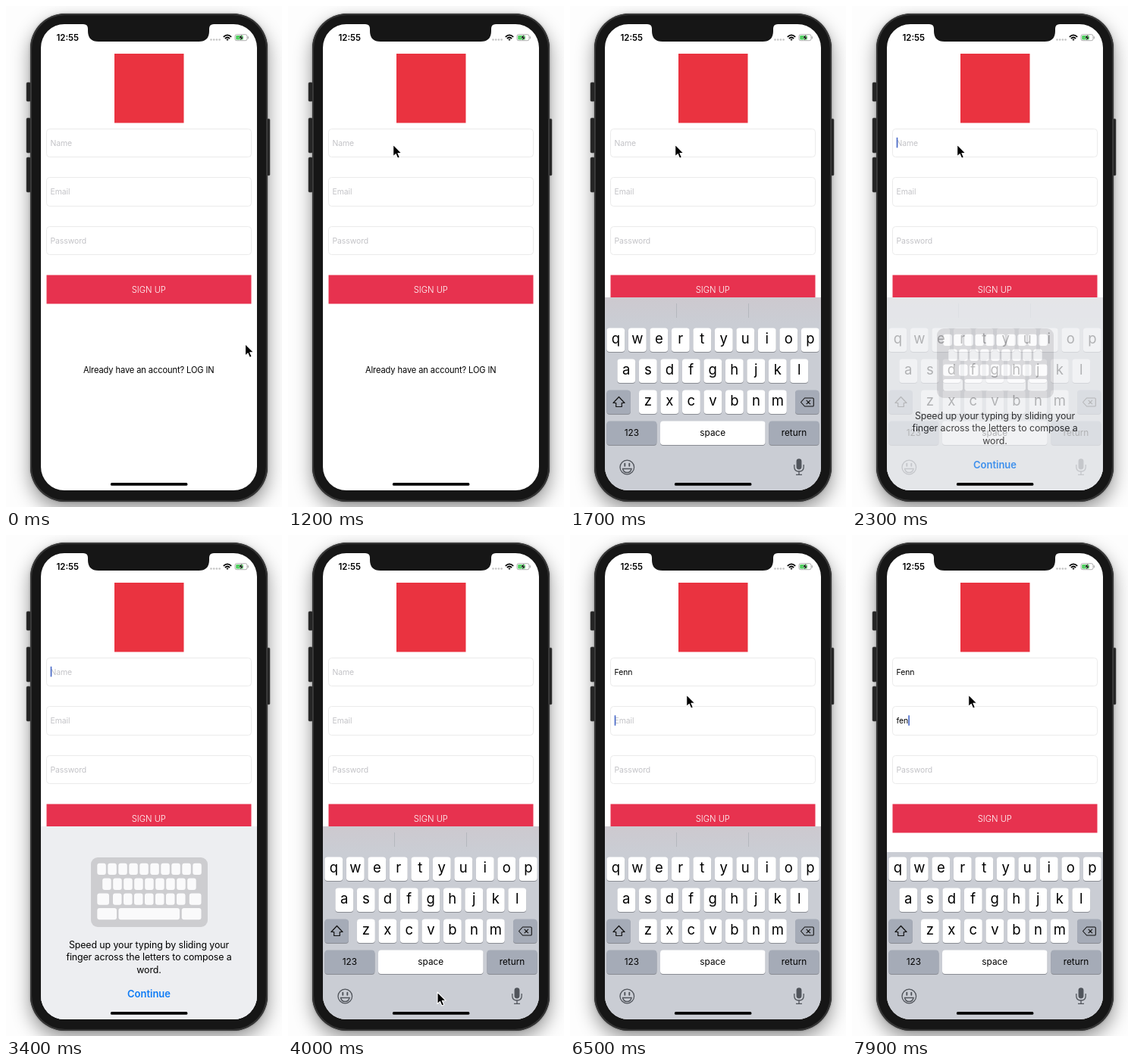
An HTML page that plays this animation: 364 px wide and 662 px high, repeating every 8 s.

```html
<!DOCTYPE html>
<html lang="en">
<head>
<meta charset="utf-8">
<title>Sign up form</title>
<style>
html, body { margin: 0; width: 100%; height: 100%; overflow: hidden; background: #fdfdfd; }
#phone {
  position: absolute; left: 32px; top: 10px; width: 313px; height: 645px;
  border-radius: 46px; background: #161616;
  box-shadow: 0 10px 24px rgba(0,0,0,.42), 0 0 3px rgba(0,0,0,.35), inset 0 0 0 2px #353535;
}
svg { position: absolute; left: 0; top: 0; display: block; }
text { font-family: Inter, "Liberation Sans", sans-serif; white-space: pre; }
.mid { text-anchor: middle; }
.hint { fill: #c3c3c7; }
.in { font-size: 10.4px; letter-spacing: -.05px; }
.letter { font-size: 18.5px; }
.label { font-size: 11.8px; }
.tip { font-size: 12.4px; letter-spacing: -.1px; }
</style>
</head>
<body>
<div id="phone"></div>
<svg id="stage" width="364" height="662" viewBox="0 0 364 662">
  <defs>
    <clipPath id="screen"><rect x="46" y="24" width="285" height="616" rx="31"/></clipPath>
    <clipPath id="board"><rect id="boardTop" x="46" y="385" width="285" height="520"/></clipPath>
    <linearGradient id="barTint" x1="0" y1="0" x2="0" y2="1">
      <stop offset="0" stop-color="#cdc9cf"/><stop offset="1" stop-color="#cacdd4"/>
    </linearGradient>
  </defs>

  <g fill="#242424" stroke="#4a4a4a" stroke-width=".6">
    <rect x="27" y="101" width="5.5" height="25" rx="1.5"/>
    <rect x="27" y="148" width="5.5" height="46" rx="1.5"/>
    <rect x="27" y="200" width="5.5" height="46" rx="1.5"/>
    <rect x="344.5" y="149" width="3.5" height="75" rx="1.5"/>
  </g>

  <g clip-path="url(#screen)">
    <rect x="46" y="24" width="285" height="616" fill="#fff"/>
    <rect x="143" y="63" width="91.5" height="91.5" fill="#ea3340"/>
    <g fill="#fff" stroke="#ebebeb">
      <rect x="53.5" y="162.5" width="270" height="37" rx="4"/>
      <rect x="53.5" y="226.5" width="270" height="38" rx="4"/>
      <rect x="53.5" y="291.5" width="270" height="37" rx="4"/>
    </g>
    <text id="name" class="in" x="58.5" y="184.5"></text>
    <text id="email" class="in" x="58.5" y="249"></text>
    <text class="in hint" x="58.5" y="313.5">Password</text>
    <rect id="caret" width="1.6" height="13.5" fill="#4466c8"/>
    <rect x="53.5" y="355.5" width="270" height="38" fill="#e7324f"/>
    <text class="mid" x="188.3" y="378.6" font-size="11.2" font-weight="300" fill="#fff">SIGN UP</text>
    <text class="mid" x="188.3" y="485" font-size="11.1" letter-spacing="-.1">Already have an account? LOG IN</text>

    <g id="keyboard">
      <g clip-path="url(#board)">
        <rect x="46" y="385" width="285" height="520" fill="#cacdd4"/>
        <g id="bar">
          <rect x="46" y="385" width="285" height="34" fill="url(#barTint)"/>
          <path d="M140.5 393V412M235.5 393V412" stroke="#b5b8be"/>
          <text id="guess" class="mid" x="93.5" y="406.5" font-size="12.2"></text>
        </g>
        <g id="keys"></g>
        <path d="M64.5 516.5L72 524.5H68.3V529.5H60.7V524.5H57Z" fill="none" stroke="#111" stroke-width="1.2" stroke-linejoin="round"/>
        <path d="M304.5 523.5L309.5 518H320Q321.3 518 321.3 519.3V527.7Q321.3 529 320 529H309.5ZM311.7 520.8L317 526.2M317 520.8L311.7 526.2" fill="none" stroke="#111" stroke-width="1.1" stroke-linejoin="round"/>
        <g fill="none" stroke="#50545b" stroke-width="1.3">
          <circle cx="75.3" cy="609.5" r="9.3"/>
          <path d="M69.5 611.5H81.1Q80 616.5 75.3 616.5T69.5 611.5Z"/>
          <path d="M72.3 604.6V607.8M78.3 604.6V607.8" stroke-width="1.9" stroke-linecap="round"/>
          <path d="M295.8 606V609Q295.8 615 302 615T308.2 609V606M302 615V619M298 619.3H306"/>
          <rect x="299.2" y="598.8" width="5.6" height="13" rx="2.8" fill="#50545b"/>
        </g>
      </g>
    </g>

    <g id="tips">
      <rect x="46" y="385" width="285" height="255" fill="#edeef1"/>
      <rect x="112" y="426" width="154" height="92" rx="9" fill="#cdcdd0"/>
      <g id="miniKeys" fill="#fafafb"></g>
      <text class="mid tip" x="188.5" y="545.5">Speed up your typing by sliding your</text>
      <text class="mid tip" x="188.5" y="562.3">finger across the letters to compose a</text>
      <text class="mid tip" x="188.5" y="579">word.</text>
      <text class="mid" x="188.5" y="610.8" font-size="13" font-weight="600" fill="#0f7bf5">Continue</text>
    </g>
    <rect x="137.8" y="630" width="101.7" height="3.8" rx="1.9"/>

    <text x="66.5" y="45.7" font-size="11.4" font-weight="600">12:55</text>
    <g fill="#c4c4c4">
      <circle cx="270.5" cy="44.5" r="1.3"/><circle cx="274.2" cy="44.5" r="1.3"/>
      <circle cx="277.9" cy="44.5" r="1.3"/><circle cx="281.6" cy="44.5" r="1.3"/>
    </g>
    <g fill="none" stroke="#000" stroke-width="1.8">
      <path d="M286.8 40.8Q292 36 297.2 40.8M288.9 43Q292 40 295.1 43"/>
      <path d="M290.4 44L292 46L293.6 44Q292 42.8 290.4 44Z" fill="#000" stroke="none"/>
    </g>
    <rect x="302" y="37.7" width="16" height="8" rx="2.2" fill="#fff" stroke="#a5a5a5" stroke-width=".9"/>
    <rect x="303.2" y="38.9" width="9.6" height="5.6" rx="1" fill="#4fd05f"/>
    <path d="M319.3 40.2V43.2" stroke="#a5a5a5" stroke-width="1.1"/>
    <path d="M311.4 37.6L306.8 42.2H309.6L308.8 45.8L313.3 41.2H310.5Z" stroke="#fff" stroke-width=".4"/>
  </g>

  <path fill="#161616" d="M102 23H274V24Q268 24 268 30V33Q268 47 254 47H122Q108 47 108 33V30Q108 24 102 24Z"/>
  <path id="cursor" d="M0 0V15.6L3.5 12.4L5.9 18L8.7 16.8L6.3 11.3H11.2Z" fill="#000" stroke="#fff" stroke-width="1.1" stroke-linejoin="round"/>
</svg>

<script>
const LOOP = 8000, STEP = 100;
const $ = id => document.getElementById(id);

function add(parent, tag, attrs, content) {
  const el = document.createElementNS('http://www.w3.org/2000/svg', tag);
  for (const k in attrs) el.setAttribute(k, attrs[k]);
  if (content) el.textContent = content;
  parent.appendChild(el);
}

function key(x, y, w, label, cls, dark) {
  const box = { x, width: w, height: 31.5, rx: 4 };
  add($('keys'), 'rect', { ...box, y: y + 1, fill: '#898c93' });
  add($('keys'), 'rect', { ...box, y, fill: dark ? '#a5abb7' : '#fff' });
  const drop = cls === 'letter' ? 20.7 : 19.8;
  if (label) add($('keys'), 'text', { class: 'mid ' + cls, x: x + w / 2, y: y + drop }, label);
}

[['qwertyuiop', 48.4, 425.5], ['asdfghjkl', 62.4, 466.5], ['zxcvbnm', 91, 507.5]]
  .forEach(([row, x, y]) => [...row].forEach((c, i) => key(x + i * 28.5, y, 23.8, c, 'letter')));
key(48.4, 507.5, 31.5, '', '', true);
key(297, 507.5, 31.5, '', '', true);
key(48.4, 548.5, 66, '123', 'label', true);
key(119, 548.5, 138.5, 'space', 'label');
key(262.4, 548.5, 66.2, 'return', 'label', true);

function mini(x, y, w) {
  add($('miniKeys'), 'rect', { x, y, width: w, height: 15.3, rx: 3 });
}
[[10, 120.3, 433.7], [9, 127.2, 453.6], [7, 141, 473.4]].forEach(([n, x, y]) => {
  for (let i = 0; i < n; i++) mini(x + i * 14, y, 11.5);
});
mini(120.3, 473.4, 15.7);
mini(241.8, 473.4, 15.7);
mini(120.3, 493, 25.7);
mini(148.5, 493, 80.5);
mini(231.8, 493, 25.7);

// time, x, y of the pointer tip
const PATH = [
  [0, 315.5, 446.5], [400, 145, 188], [800, 145, 188], [1100, 138.7, 183.2],
  [2700, 138.7, 183.2], [3300, 215, 666], [3500, 215, 666], [3600, 204, 622],
  [3800, 197, 604], [4400, 197, 604], [5100, 153.7, 211]
];
// time, typed text
const NAME = [[5200, 'F'], [5700, 'Fe'], [5900, 'Fen'], [6100, 'Fenn']];
const EMAIL = [[7300, 'f'], [7600, 'fe'], [7800, 'fen']];
const BLINK = [[2000, 2500], [3000, 3500], [4100, 4600], [5100, 8000]];

const ramp = (t, a, b) => Math.min(1, Math.max(0, (t - a) / (b - a)));
const typed = (list, t) => list.reduce((s, [at, text]) => t >= at ? text : s, '');

function pointer(t) {
  const i = PATH.findIndex(p => p[0] > t);
  if (i < 0) return PATH[PATH.length - 1].slice(1);
  const [t0, x0, y0] = PATH[i - 1], [t1, x1, y1] = PATH[i];
  const u = ramp(t, t0, t1), e = u * u * (3 - 2 * u);
  return [x0 + (x1 - x0) * e, y0 + (y1 - y0) * e];
}

function field(id, text, hint) {
  $(id).textContent = text || hint;
  $(id).classList.toggle('hint', !text);
}

function draw(t) {
  const name = typed(NAME, t), email = typed(EMAIL, t);
  const onEmail = t >= 6500;
  field('name', name, 'Name');
  field('email', email, 'Email');
  $('guess').textContent = name && !onEmail ? '“' + name + '”' : '';

  const active = onEmail ? 'email' : 'name';
  const filled = onEmail ? email : name;
  $('caret').setAttribute('x', 58.7 + (filled ? $(active).getComputedTextLength() : 0));
  $('caret').setAttribute('y', onEmail ? 238.3 : 173.8);
  $('caret').style.opacity = BLINK.some(([a, b]) => t >= a && t < b) ? 1 : 0;

  const drop = 255 * Math.pow(1 - ramp(t, 1200, 1700), 3.4);
  $('keyboard').setAttribute('transform', `translate(0 ${drop})`);
  const fold = ramp(t, 6500, 6800);
  $('boardTop').setAttribute('y', 385 + 34 * fold);
  $('bar').style.opacity = 1 - fold;
  $('tips').style.opacity = ramp(t, 2000, 2400) - ramp(t, 3700, 4000);

  $('cursor').setAttribute('transform', `translate(${pointer(t)})`);
}

const start = performance.now();
function tick() {
  const t = (performance.now() - start) % LOOP;
  draw(Math.floor(t / STEP) * STEP);
  requestAnimationFrame(tick);
}
tick();
</script>
</body>
</html>
```
